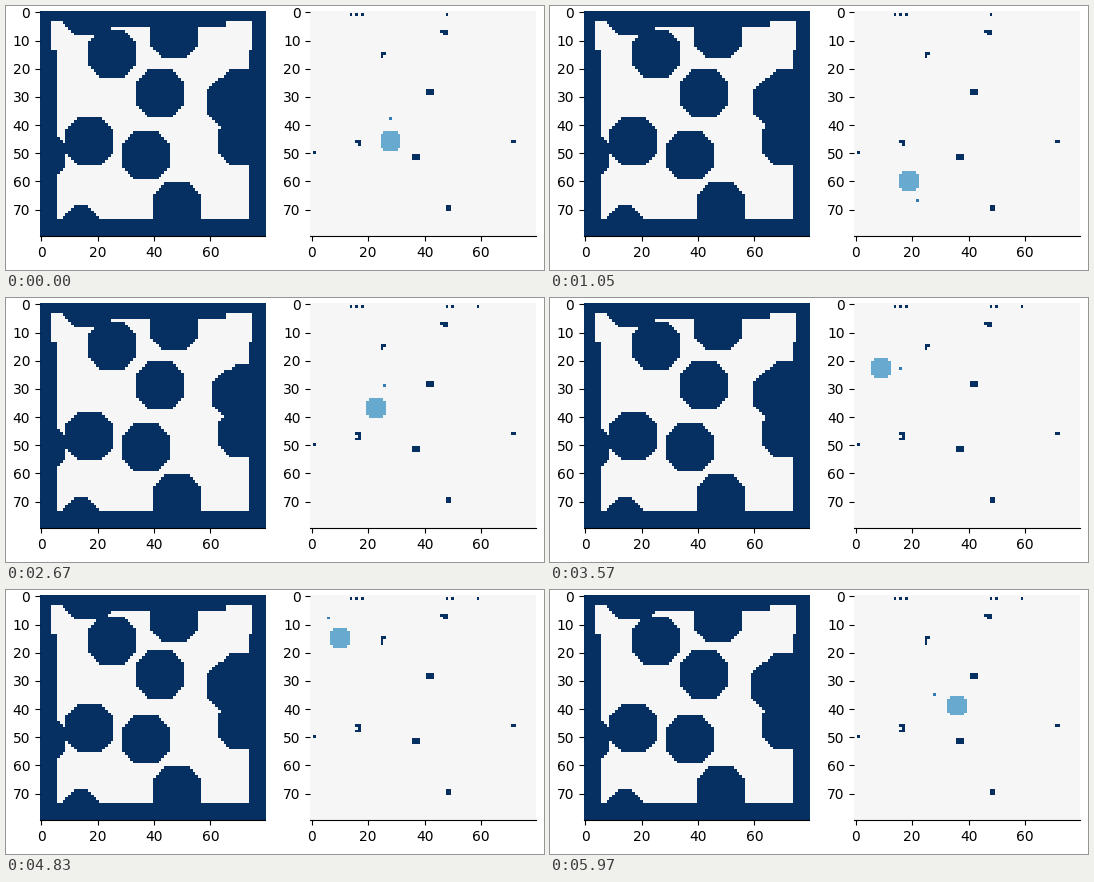
Write a matplotlib script that moves like this. It is 538x264 px and loops after 6 s.

```python
import numpy as np
import matplotlib.pyplot as plt
from matplotlib.animation import FuncAnimation

W, H, DPI = 538, 264, 100
N, FRAMES, TICK = 80, 200, 30
SIDE = 225.4545
SPEED = 0.022  # cells per ms at the key poses
yy, xx = np.mgrid[:N, :N]

# Key poses of the robot: time, x, y, tail angle (degrees, y down)
KEYS = [(0, 28, 46, -90), (750, 22, 67, 0), (1050, 19, 60, 67),
        (1900, 27, 44, 95), (2670, 23, 37, -66), (3570, 9, 23, 0),
        (4410, 7, 9, 62), (5370, 15, 34, -66), (5970, 36, 39, -156)]

# Obstacle cells: x, y, width, height
BLOCKS = [(46, 7, 3, 1), (47, 8, 2, 1), (25, 15, 2, 1), (41, 28, 3, 2),
          (16, 46, 2, 1), (17, 47, 1, 1), (71, 46, 2, 1), (1, 50, 1, 1),
          (36, 51, 3, 2), (48, 69, 2, 2)]

# Centres of the fixed inflated obstacles
DISCS = [(16, 0), (18, 0), (47, 8), (37, 51), (48, 69), (0, 51), (71, 46)]


def unit(deg):
    a = np.radians(deg)
    return np.array([np.cos(a), np.sin(a)])


def pose(t):
    """Cubic Hermite path; the tail points against the motion."""
    i = max(k for k in range(len(KEYS) - 1) if KEYS[k][0] <= t)
    (t0, *p0, a0), (t1, *p1, a1) = KEYS[i:i + 2]
    p0, p1 = np.array(p0), np.array(p1)
    d = t1 - t0
    s = (t - t0) / d
    m0, m1 = -SPEED * d * unit(a0), -SPEED * d * unit(a1)
    c2 = 3 * (p1 - p0) - 2 * m0 - m1
    c3 = 2 * (p0 - p1) + m0 + m1
    pos = p0 + s * (m0 + s * (c2 + s * c3))
    vel = m0 + s * (2 * c2 + 3 * s * c3)
    return np.rint(pos).astype(int), -vel / np.hypot(*vel)


def octagon(cx, cy, r, reach):
    dx, dy = abs(xx - cx), abs(yy - cy)
    return (dx <= r) & (dy <= r) & (dx + dy <= reach)


def walls():
    m = (yy < 4) | (yy >= 74) | (xx < 4) | (xx >= 75)
    m |= (yy >= 14) & ((xx < 6) | (xx >= 74))
    return m | ((yy < 6) & (xx >= 14) & (xx < 66))


def free_space(t):
    mid, late = t >= 1500, t >= 4800
    sway = 1 - np.cos(2 * np.pi * t / 5300)
    k = int(np.rint(sway))
    discs = DISCS + [(25, 15 + late), (42, 29 - late), (17, 46 + mid),
                     (67 + k, 32), (71 + k, 29 + k // 2)]
    m = walls() | octagon(14, 77, 8, 10)
    for x, y in discs:
        m |= octagon(x, y, 8, 12)
    return (m | ((xx >= 71) & (yy >= 29) & (yy <= 46))).astype(float)


def world(t):
    g = np.zeros((N, N))
    for x, y, w, h in BLOCKS:
        g[y:y + h, x:x + w] = 1
    g[1, [14, 16, 18, 48]] = 1
    # cells detected on the way
    g[1, 50] = t >= 1700
    g[1, 59] = t >= 2300
    g[48, 16:18] = t >= 1500
    g[16:17 + (t >= 4800), 25] = 1

    (cx, cy), tail = pose(t)
    g[octagon(cx, cy, 3, 5)] = 0.5
    tx, ty = np.floor(7.8 * tail + 0.1).astype(int) + (cx, cy)
    if 0 <= tx < N and 0 <= ty < N:
        g[ty, tx] = 0.7
    return g


fig = plt.figure(figsize=(W / DPI, H / DPI), dpi=DPI, facecolor="white")


def panel(left, data):
    ax = fig.add_axes([left / W, 1 - (5 + SIDE) / H, SIDE / W, SIDE / H])
    im = ax.imshow(data, cmap="RdBu", vmin=-1, vmax=1,
                   interpolation="nearest", aspect="auto")
    ax.set_xticks(range(0, N, 20))
    ax.set_yticks(range(0, N, 10))
    ax.spines[["left", "top", "right"]].set_visible(False)
    return im


left = panel(33.9, free_space(0))
right = panel(304.45, world(0))


def update(i):
    t = i * TICK
    left.set_data(free_space(t))
    right.set_data(world(t))
    return left, right


anim = FuncAnimation(fig, update, frames=FRAMES, interval=TICK,
                     repeat=True, repeat_delay=0, blit=False)
plt.show()
```
